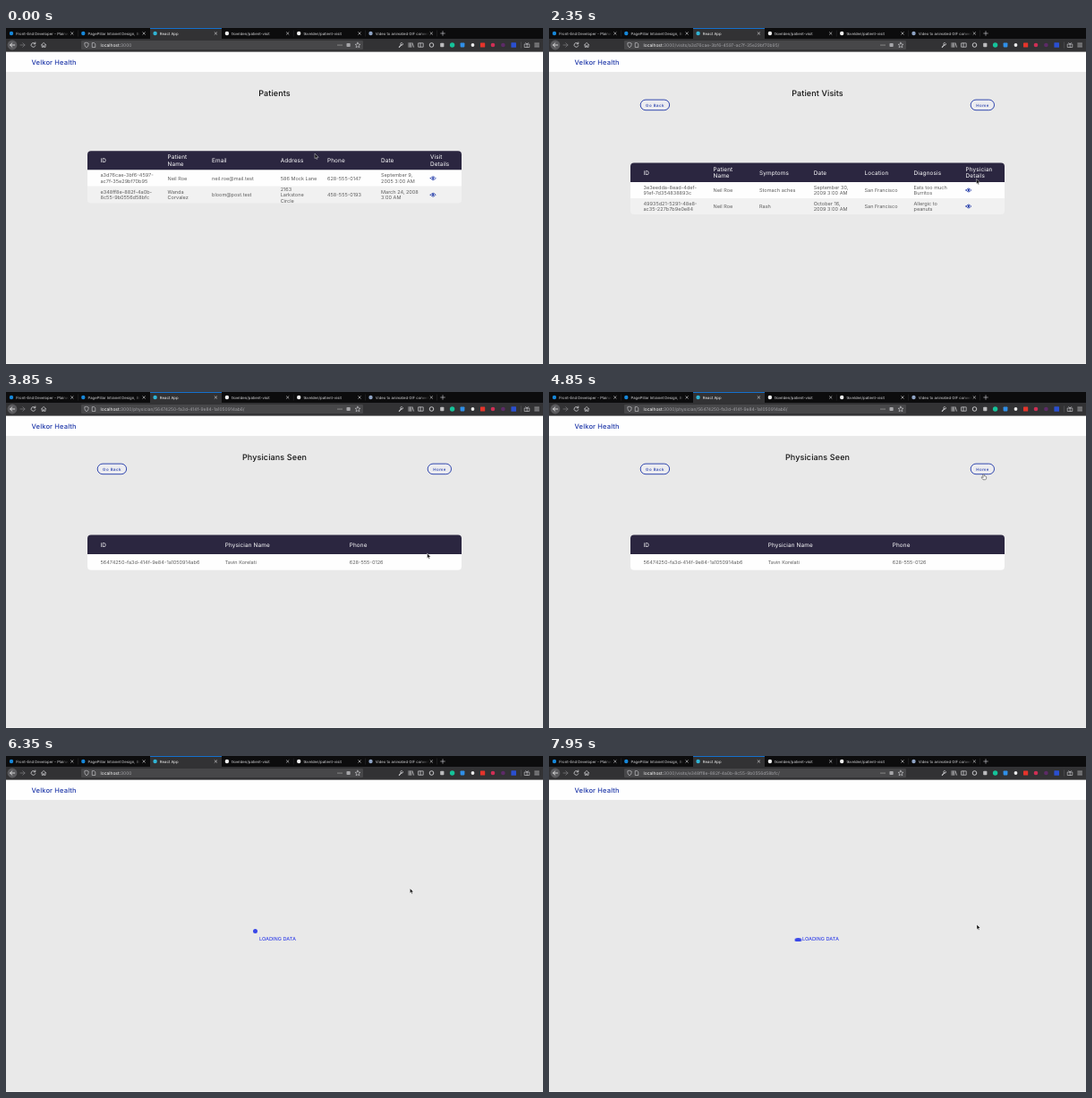
An HTML page that plays this animation: 600x375 px, repeating every 8 s.

```html
<!DOCTYPE html>
<html lang="en">
<head>
<meta charset="utf-8">
<title>Patient visits</title>
<style>
html, body { margin: 0; width: 100%; height: 100%; overflow: hidden; background: #e9e9e9; }
#stage { position: absolute; left: 0; top: 0; width: 600px; height: 375px; overflow: hidden; }
svg { position: absolute; left: 0; top: 0; display: block; }
text { font-family: Inter, "Open Sans", sans-serif; text-rendering: geometricPrecision; white-space: pre; }
#ball { position: absolute; left: 275.7px; width: 5.4px; height: 5.4px; background: #3a48e8; }
</style>
</head>
<body>
<div id="stage">
  <svg id="view" width="600" height="375" viewBox="0 0 600 375"></svg>
  <div id="ball"></div>
</div>
<script>
const view = document.getElementById('view');
const ball = document.getElementById('ball');
const NAVY = '#1d36a8', LIGHT = '#d6d6d8';

function el(parent, tag, attrs = {}, content) {
  const node = document.createElementNS('http://www.w3.org/2000/svg', tag);
  for (const k in attrs) node.setAttribute(k, attrs[k]);
  if (content !== undefined) node.textContent = content;
  parent.appendChild(node);
  return node;
}
const group = (parent = view) => el(parent, 'g');
const rect = (p, x, y, w, h, fill, rx = 0) => el(p, 'rect', { x, y, width: w, height: h, fill, rx });
const dot = (p, cx, cy, r, fill) => el(p, 'circle', { cx, cy, r, fill });
const path = (p, d, stroke, width = 0.8, fill = 'none') =>
  el(p, 'path', { d, stroke, fill, 'stroke-width': width, 'stroke-linecap': 'round', 'stroke-linejoin': 'round' });

// y is the optical middle of the line
function label(p, x, y, str, size, fill, extra = {}) {
  return el(p, 'text', { x, y: y + size * 0.36, 'font-size': size, fill, ...extra }, str);
}
function lines(p, x, y, str, size, gap, fill, extra) {
  const parts = str.split('\n');
  parts.forEach((s, i) => label(p, x, y + (i - (parts.length - 1) / 2) * gap, s, size, fill, extra));
}

function drawTabs() {
  rect(view, 0, 0, 600, 12, '#0c0c0d');
  rect(view, 0, 12, 600, 14.6, '#323234');
  rect(view, 161, 0, 80, 12, '#323234');
  rect(view, 161, 0, 80, 0.75, '#0a84ff');
  const fade = el(el(view, 'defs'), 'linearGradient', { id: 'fade' });
  el(fade, 'stop', { offset: 0, 'stop-color': '#0c0c0d', 'stop-opacity': 0 });
  el(fade, 'stop', { offset: 1, 'stop-color': '#0c0c0d' });
  const tabs = [
    ['Front-End Developer - Plainw', '#1687d9'],
    ['PagePillar Intranet Design, Br', '#1687d9'],
    ['React App', '#31b4d5'],
    ['tkvelden/patient-visit', '#f2f2f2'],
    ['tkvelden/patient-visit', '#f2f2f2'],
    ['Video to animated GIF conver', '#8fa3c4']
  ];
  tabs.forEach(([name, color], i) => {
    const x = i * 80.3;
    dot(view, x + 6, 6, 2.2, color);
    label(view, x + 11.2, 6, name, 4.25, i === 2 ? '#f4f4f4' : '#d6d6d8');
    if (i !== 2) {
      rect(view, x + 62, 2, 8, 8, 'url(#fade)');
      rect(view, x + 70, 2, 10, 8, '#0c0c0d');
      if (i !== 1) rect(view, x + 80, 2.5, 0.4, 7, '#38383a');
    }
    path(view, `M${x + 72.5} 4.7l2.6 2.6m0-2.6l-2.6 2.6`, '#dcdcde', 0.6);
  });
  path(view, 'M485.7 6h4.6M488 3.7v4.6', LIGHT, 0.6);
}

function drawToolbar() {
  dot(view, 7, 19, 5.4, '#5a5a5d');
  path(view, 'M9.7 19h-5m2.2-2.2L4.6 19l2.3 2.2', '#f2f2f2');
  path(view, 'M16 19h5m-2.2-2.2L21.1 19l-2.3 2.2', '#77777a');
  path(view, 'M32.5 17.5a2.4 2.4 0 1 0 .3 2.3M32.8 16v1.8H31', LIGHT);
  path(view, 'M39.4 19l2.7-2.6 2.7 2.6M40.2 18.6v2.8h1.3v-1.6h1.2v1.6H44v-2.8', LIGHT, 0.7);
  rect(view, 84, 14, 315, 10, '#474749', 1.2);
  path(view, 'M90 16.4l2.2.7c0 2.4-.5 3.7-2.2 4.7-1.7-1-2.2-2.3-2.2-4.7z', LIGHT, 0.6);
  path(view, 'M96.6 16.6h2l1.2 1.2v3.7h-3.2z', LIGHT, 0.6);
  [371, 373, 375].forEach(x => dot(view, x, 19, 0.55, LIGHT));
  rect(view, 380.5, 17, 4.2, 4, '#a6a6a9', 0.8);
  path(view, 'M393 16.2l.9 1.9 2 .2-1.5 1.4.5 2-1.9-1-1.9 1 .5-2-1.5-1.4 2-.2z', LIGHT, 0.6);
  path(view, 'M439.3 21.4l2.7-2.9', LIGHT, 1.1);
  path(view, 'M443.6 17.6a1.4 1.4 0 1 1-1.3-1.2', LIGHT, 0.7);
  path(view, 'M450 16.7v4.6M451.5 16.7v4.6M453 16.7v4.6M454.1 16.9l1.4 4.3', LIGHT, 0.7);
  path(view, 'M461 16.9h5.2v4.3H461zM463 17v4', LIGHT, 0.7);
  el(view, 'circle', { cx: 475.5, cy: 19, r: 2.3, fill: 'none', stroke: LIGHT, 'stroke-width': 0.9 });
  rect(view, 485.2, 16.7, 4.2, 4.6, '#bcbcbe', 0.8);
  dot(view, 498.6, 19, 2.7, '#15c39a');
  rect(view, 507.6, 16.4, 4.8, 5, '#2f8fe8', 0.8);
  dot(view, 521.5, 19, 1.9, '#ececec');
  rect(view, 530, 16.4, 5.2, 5.2, '#e5342b', 0.6);
  dot(view, 544, 19, 2.3, '#cf2f55');
  dot(view, 555.4, 19, 2.3, '#5d2a68');
  rect(view, 564.4, 16.2, 5.6, 5.6, '#2a4fd0', 0.6);
  rect(view, 575.2, 15.5, 0.4, 7, '#68686b');
  path(view, 'M579.6 18h5.2v3.5h-5.2zM582.2 18v3.5M582.2 18l-1.5-1.5M582.2 18l1.5-1.5', LIGHT, 0.6);
  path(view, 'M590.8 17.1h4.7M590.8 19h4.7M590.8 20.9h4.7', LIGHT, 0.7);
}

rect(view, 0, 0, 600, 49.3, '#fefefe');
drawTabs();
drawToolbar();
rect(view, 0, 49.3, 600, 326, '#e9e9e9');
rect(view, 0, 374.3, 600, 0.7, '#f6f6f6');
label(view, 28.5, 37.8, 'Velkor Health', 7.5, NAVY, { 'font-weight': 500, 'letter-spacing': 0.17 });

const address = el(view, 'text', { x: 105.5, y: 20.8, 'font-size': 4.95 });
el(address, 'tspan', { fill: '#f6f6f6' }, 'localhost:');
const rest = el(address, 'tspan', { fill: '#a2a2a6' });

const title = (p, str) => label(p, 300, 72.7, str, 9, '#111',
  { 'font-weight': 500, 'text-anchor': 'middle', 'letter-spacing': 0.12 });

function button(p, x, w, str) {
  el(p, 'rect', { x, y: 80.1, width: w, height: 11.6, rx: 5.8, fill: '#ececf0', stroke: NAVY, 'stroke-width': 0.9 });
  label(p, x + w / 2 + 0.2, 86, str, 4.4, NAVY,
    { 'font-weight': 500, 'text-anchor': 'middle', 'letter-spacing': 0.5 });
}

function eye(p, x, y) {
  path(p, `M${x - 2.9} ${y}q2.9-4 5.8 0q-2.9 4-5.8 0z`, NAVY, 0.8);
  dot(p, x, y, 1.15, NAVY);
}

function table(p, top, tops, cols, heads, rows) {
  const end = tops[tops.length - 1];
  path(p, `M91 ${tops[0]}V${top + 4}q0-4 4-4h410q4 0 4 4V${tops[0]}z`, 'none', 0, '#2b2640');
  rows.forEach((row, r) => {
    const y = tops[r], b = tops[r + 1], mid = (y + b) / 2;
    const fill = r % 2 ? '#f1f1f1' : '#fefefe';
    path(p, b === end ? `M91 ${y}h418V${b - 4}q0 4-4 4H95q-4 0-4-4z` : `M91 ${y}h418V${b}H91z`, 'none', 0, fill);
    row.forEach((s, c) => s === 'eye'
      ? eye(p, cols[c] + 3.2, mid)
      : lines(p, cols[c], mid, s, 5.55, 6.5, '#606060'));
  });
  heads.forEach((s, c) => lines(p, cols[c], (top + tops[0]) / 2, s, 6.4, 7.6, '#fff', { 'letter-spacing': 0.12 }));
}

const pages = { patients: group(), visits: group(), doctors: group(), loading: group() };

title(pages.patients, 'Patients');
table(pages.patients, 137.3, [158.6, 176.8, 195.6],
  [105.5, 180.5, 230, 306.7, 359, 419, 474],
  ['ID', 'Patient\nName', 'Email', 'Address', 'Phone', 'Date', 'Visit\nDetails'],
  [
    ['a3d76cae-3bf6-4597-\nac7f-35e29bf70b95', 'Neil Roe', 'neil.roe@mail.test', '586 Mock Lane',
      '628-555-0147', 'September 9,\n2005 3:00 AM', 'eye'],
    ['e348ff8e-882f-4a0b-\n8c55-9b0556d58bfc', 'Wanda\nCorvalez', 'bloom@post.test', '2163\nLarkstone\nCircle',
      '458-555-0193', 'March 24, 2008\n3:00 AM', 'eye']
  ]);

title(pages.visits, 'Patient Visits');
table(pages.visits, 150.6, [172, 190, 208],
  [105.5, 183.5, 235, 295.7, 352.5, 407.5, 465.6],
  ['ID', 'Patient\nName', 'Symptoms', 'Date', 'Location', 'Diagnosis', 'Physician\nDetails'],
  [
    ['3e3eedda-8ead-4def-\n91ef-7d354838893c', 'Neil Roe', 'Stomach aches', 'September 30,\n2009 3:00 AM',
      'San Francisco', 'Eats too much\nBurritos', 'eye'],
    ['49935d21-5291-48e8-\nac35-227b7b9e0e84', 'Neil Roe', 'Rash', 'October 16,\n2009 3:00 AM',
      'San Francisco', 'Allergic to\npeanuts', 'eye']
  ]);

title(pages.doctors, 'Physicians Seen');
table(pages.doctors, 159.5, [181, 198.8],
  [105.5, 244.7, 383.7],
  ['ID', 'Physician Name', 'Phone'],
  [['56474250-fa3d-414f-9e84-1a1050914ab6', 'Tavin Korelati', '628-555-0126']]);

[pages.visits, pages.doctors].forEach(p => {
  button(p, 102.2, 32.4, 'Go Back');
  button(p, 471.2, 26.3, 'Home');
});

label(pages.loading, 282.9, 204, 'LOADING DATA', 5.6, '#3a48e8', { 'font-weight': 500 });

const FIRST = '3000/visits/a3d76cae-3bf6-4597-ac7f-35e29bf70b95/';
const DOCTOR = '3000/physician/56474250-fa3d-414f-9e84-1a1050914ab6/';
const SECOND = '3000/visits/e348ff8e-882f-4a0b-8c55-9b0556d58bfc/';

const status = group();
rect(status, 0, 368.8, 125, 6.2, '#66666a');
label(status, 1.2, 372, 'localhost:' + FIRST, 4, '#f0f0f0');

const cursor = group();
const arrow = path(cursor, 'M0 0V5.2L1.2 4.1l.8 1.9 .9-.4-.8-1.8h1.7z', '#fff', 0.4, '#111');
const hand = path(cursor,
  'M-.6.5Q0-.4.6.5V2.2q2.5 0 2.6 1.2V4.6Q3 6 2.3 6.3H-.5Q-1.6 5.2-2.4 3.6-2 2.7-.6 3.8z', '#222', 0.5, '#fff');

// start time, page, path after the host
const SCENES = [
  [0, 'patients', '3000'],
  [1300, 'loading', FIRST],
  [1950, 'visits', FIRST],
  [3150, 'loading', DOCTOR],
  [3550, 'doctors', DOCTOR],
  [5850, 'loading', '3000'],
  [6550, 'patients', '3000'],
  [7900, 'loading', SECOND]
];
// time, x, y of the pointer tip
const MOVES = [
  [0, 345, 140.5], [100, 345, 140.5], [150, 466, 160], [250, 466, 160], [500, 481, 164], [650, 481, 164],
  [700, 482, 166], [850, 482, 166], [900, 477.6, 168.5], [2400, 477.6, 168.8], [2900, 470.6, 180.3],
  [4250, 470.6, 180.3], [4800, 485.5, 91.5], [5050, 485.5, 91.5], [5200, 485.5, 88.5], [5850, 485.5, 88.5],
  [6350, 451.4, 147.9], [6650, 462, 172], [7000, 478, 187], [7900, 478, 188.3], [8000, 478, 188.3]
];
const HOVERS = [[900, 1300], [2800, 3150], [4700, 5850], [6950, 7900]];

const bounce = ball.animate([
  { top: '203.7px', height: '1.9px', borderRadius: '22px 22px 7.5px 7.5px', transform: 'scaleX(2)', easing: 'ease' },
  { offset: 0.35, height: '5.4px', borderRadius: '50%', transform: 'scaleX(1)', easing: 'ease' },
  { top: '192.6px', height: '5.4px', borderRadius: '50%', transform: 'scaleX(1)' }
], { duration: 500, iterations: Infinity, direction: 'alternate' });
bounce.pause();

const show = (node, on) => { node.style.display = on ? '' : 'none'; };
const smooth = u => u * u * (3 - 2 * u);

function tip(t) {
  const i = MOVES.findIndex(m => m[0] > t);
  const [t0, x0, y0] = MOVES[i - 1], [t1, x1, y1] = MOVES[i];
  const u = smooth((t - t0) / (t1 - t0));
  return [x0 + (x1 - x0) * u, y0 + (y1 - y0) * u];
}

function render(t) {
  const [start, name, url] = SCENES.filter(s => s[0] <= t).pop();
  for (const k in pages) show(pages[k], k === name);
  rest.textContent = url;
  show(ball, name === 'loading');
  bounce.currentTime = t - start;
  show(status, t >= 900 && t < 1950);
  const over = HOVERS.some(([a, b]) => t >= a && t < b);
  show(hand, over);
  show(arrow, !over);
  cursor.setAttribute('transform', `translate(${tip(t)})`);
}

const begin = performance.now();
function tick() {
  const t = (performance.now() - begin) % 8000;
  render(Math.floor(t / 50) * 50);
  requestAnimationFrame(tick);
}
render(0);
requestAnimationFrame(tick);
</script>
</body>
</html>
```
